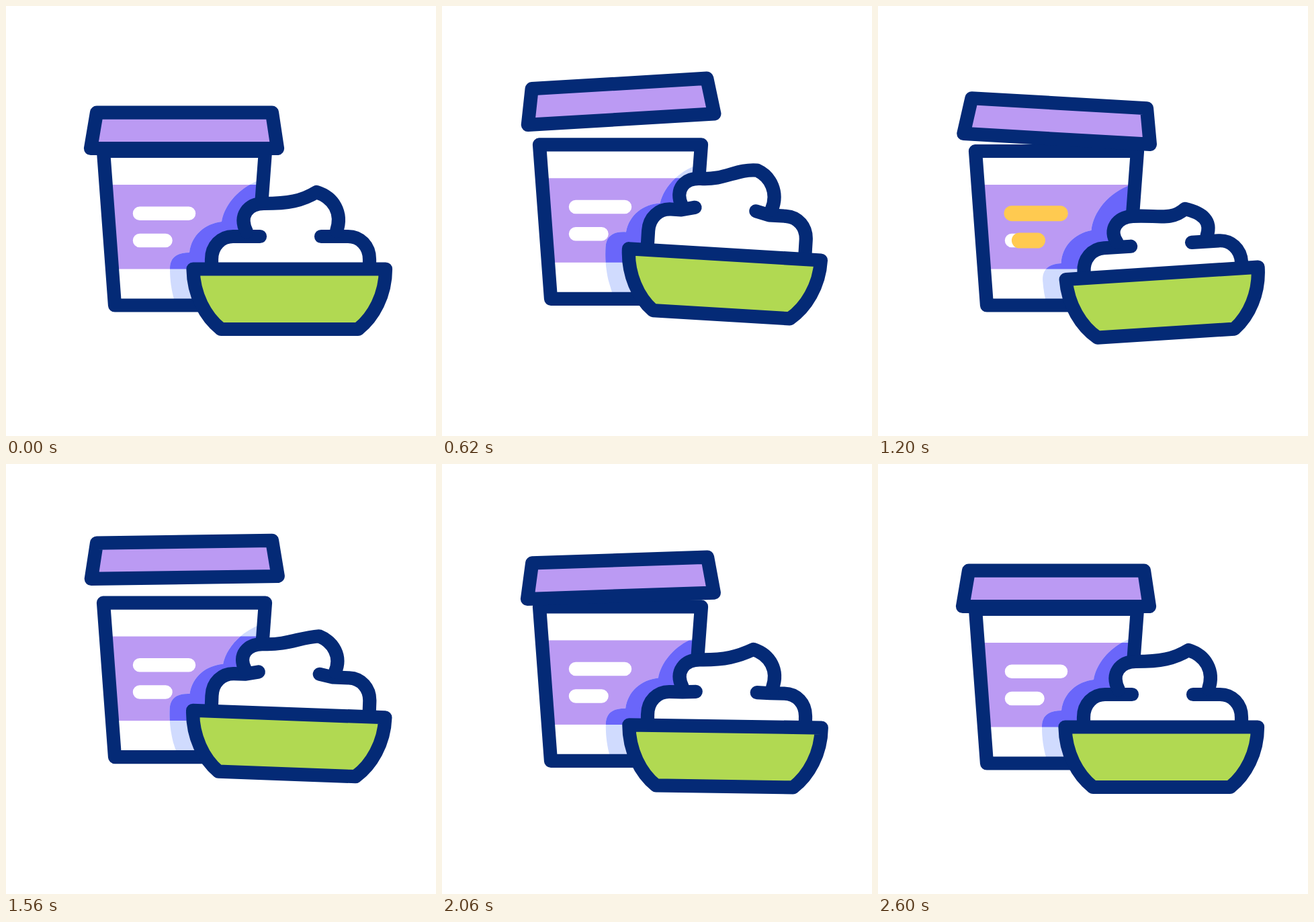
Write an HTML page that moves like this. It is 640 px wide and 640 px high and loops after 2.7 s.

```html
<!DOCTYPE html>
<html lang="en">
<head>
<meta charset="utf-8">
<title>Yogurt</title>
<style>
  html, body { margin: 0; height: 100%; overflow: hidden; background: #fff; }
  svg { display: block; width: 100vw; height: 100vh; }
  .line { stroke: #042a76; stroke-width: 20.2; stroke-linecap: round; stroke-linejoin: round; }
  .bar { stroke: #fff; stroke-width: 20.5; stroke-linecap: round; }
  .glow { stroke: #ffca50; stroke-width: 23; stroke-linecap: round; }
</style>
</head>
<body>
<svg viewBox="0 0 640 640" fill="none">
  <defs>
    <path id="wall" d="M145 216H386L369 445.5H162Z"/>
    <path id="shade" d="M400 253L385 257C350 266 325 295 321 321C296 324 276 341 273 367C256 367 244 373 244 391C244 408 246 422 251 440L262 470H420Z"/>
    <clipPath id="inside"><use href="#wall"/></clipPath>
    <clipPath id="band"><rect x="140" y="266" width="260" height="125.5"/></clipPath>
  </defs>
  <g id="cup">
    <g clip-path="url(#inside)">
      <rect x="140" y="266" width="260" height="125.5" fill="#bb9af3"/>
      <use class="shade" href="#shade" fill="#d0dbfe"/>
      <g clip-path="url(#band)"><use class="shade" href="#shade" fill="#6a66fa"/></g>
    </g>
    <path class="bar" d="M199 308.7H272M199 349H237.5"/>
    <path class="glow" id="glow1"/>
    <path class="glow" id="glow2"/>
    <use href="#wall" class="line"/>
  </g>
  <path id="lid" class="line" fill="#bb9af3" d="M135 158.7H396L404 212H126Z"/>
  <g id="bowl">
    <path id="body" fill="#fff"/>
    <path id="left" class="line" fill="#fff"/>
    <path id="right" class="line" fill="#fff"/>
    <path id="swirl" class="line"/>
    <path class="line" fill="#b1d952" d="M278.5 391.5H565C565 430 547 463 524 481H320C297 463 279 430 278.5 391.5Z"/>
  </g>
</svg>
<script>
const $ = id => document.getElementById(id);
const STEP = 20, LOOP = 2700, LAST = 130;

// Value at frame f of [frame, value] keys joined by sine easing
function ease(f, ...keys) {
  if (f <= keys[0][0]) return keys[0][1];
  for (let i = 1; i < keys.length; i++) {
    const [a, u] = keys[i - 1], [b, v] = keys[i];
    if (f < b) return u + (v - u) * (1 - Math.cos(Math.PI * (f - a) / (b - a))) / 2;
  }
  return keys[keys.length - 1][1];
}

const move = (id, value) => $(id).setAttribute('transform', value);
const shape = (id, d) => $(id).setAttribute('d', d);

// A stroke whose head runs ahead of its tail along a bar
function sweep(id, f, x, y, length, head, tail) {
  const end = ease(f, [head, 0], [head + 15, length]);
  const start = ease(f, [tail, 0], [tail + 15, length]);
  shape(id, end > start ? `M${x + start} ${y}H${x + end}` : '');
}

// One side of the cream, mirrored by side = -1 or 1
function swell(side, lift, lean) {
  const x = d => 423.5 + side * d, y = 343 + lift;
  return `M${x(45.5) + lean} ${y + lean}L${x(65.5) + lean} ${y}H${x(85.5)}` +
    `C${x(103.5)} ${y} ${x(117.5)} ${y + 14} ${x(117.5)} ${y + 34}V391`;
}

function drawCream(f) {
  const sway = (up, down, again) => ease(f, [10, 0], [34, up], [60, down], [79, again], [113, 0]);
  const lift = sway(-14.5, 5.5, -8.5), top = sway(-13.5, 10, -5);
  const tip = sway(-14, 21, -3), sag = sway(-28, 25, -13), lean = sway(-5, 0, -4);
  const at = (x, y) => `${x + lean} ${y} `;

  const swirl = 'M' + at(358, 336 + lift) +
    'C' + at(346, 312 + top) + at(360, 294 + top) + at(384, 294 + top) +
    'C' + at(420, 294 + top) + at(441 + lean, 290 + sag) + `462 ${277 + tip}` +
    'C' + at(488, 285 + tip) + at(501, 308 + top) + at(492, 335 + lift);
  shape('swirl', swirl);
  shape('body', swirl + 'L541 391H306Z');
  shape('left', swell(-1, lift, lean));
  shape('right', swell(1, lift, lean));
}

function draw(now) {
  const f = Math.min(Math.floor(now % LOOP / STEP), LAST);
  const hop = (up, down, again) => ease(f, [10, 0], [37, up], [60, down], [84, again], [115, 0]);

  const cupY = hop(-11, 0, -11);
  move('cup', `translate(0 ${cupY})`);

  const lidTurn = ease(f, [10, 0], [44, -5], [60, 3.3], [92, -3.6], [115, 0]);
  move('lid', `translate(${hop(0, 2.7, 0)} ${hop(-49, -14, -48)}) rotate(${lidTurn} 265 185)`);

  const bowlY = ease(f, [10, 0], [29, -22], [57, 7.5], [80, -20], [107, 0]);
  const bowlTurn = ease(f, [10, 0], [34, 3.6], [61, -3.7], [84, 3.2], [113, 0]);
  const tilt = `rotate(${bowlTurn} 421.5 378)`;
  move('bowl', `translate(0 ${bowlY}) ${tilt}`);
  for (const el of document.querySelectorAll('.shade'))
    el.setAttribute('transform', `translate(0 ${bowlY - cupY}) ${tilt}`);

  drawCream(f);
  sweep('glow1', f, 199, 308.7, 73, 46, 62);
  sweep('glow2', f, 199, 349, 38.5, 36.5, 54.5);
}

const origin = performance.now();
function tick() {
  draw(performance.now() - origin);
  requestAnimationFrame(tick);
}
tick();
</script>
</body>
</html>
```
